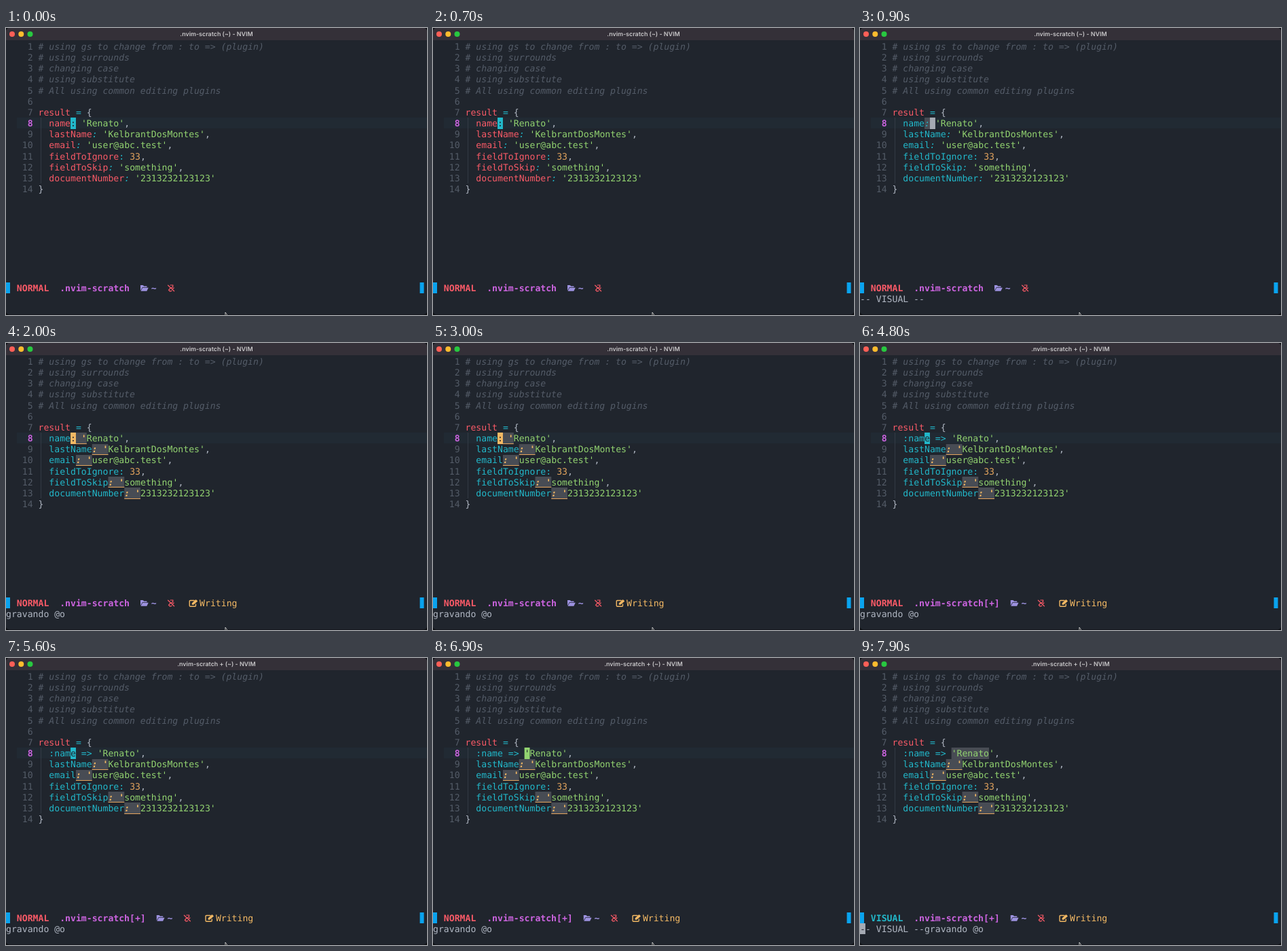
Animation, 620 px wide and 423 px high, one loop 8 s. Source, as an HTML page:

```html
<!DOCTYPE html>
<html>
<head>
<meta charset="utf-8">
<style>
  html, body { margin: 0; width: 100%; height: 100%; overflow: hidden; background: #0b0d10; }
  svg { display: block; }
  text { white-space: pre; text-rendering: geometricPrecision; }
  #screen { font: 13.155px "DejaVu Sans Mono", monospace; }
  .b { font-weight: bold; }
  .i { font-style: italic; }
  #title { font: 600 8.9px Inter, sans-serif; fill: #c9c8ca; text-anchor: middle; }
</style>
</head>
<body>
<svg width="620" height="423" viewBox="0 0 620 423">
  <rect width="620" height="422.5" rx="5" fill="#20252d"/>
  <path d="M0 18V5a5 5 0 0 1 5-5H615a5 5 0 0 1 5 5V18z" fill="#343038"/>
  <circle cx="9" cy="9" r="4" fill="#ff5f57"/>
  <circle cx="22.3" cy="9" r="4" fill="#febc2e"/>
  <circle cx="35.5" cy="9" r="4" fill="#28c840"/>
  <text id="title" x="310" y="12.3"></text>
  <g id="screen"></g>
  <path d="M323 419v6l3-1.5z" fill="#000" stroke="#e8e8e8" stroke-width=".8"/>
</svg>
<script>
const CW = 7.92, RH = 16.17, TOP = 19.3;
const BG = '#20252d', FG = '#b0b7c3', GREY = '#545c68', RED = '#f95a67', TEAL = '#22b8ca',
  GREEN = '#92d370', ORANGE = '#e5a55e', YELLOW = '#f3b964', PURPLE = '#cc64e0',
  LILAC = '#9d92e0', BLUE = '#0aa3ee', SELECT = '#484c54', BLOCK = '#a5aab3';

const comments = [
  '# using gs to change from : to => (plugin)', '# using surrounds', '# changing case',
  '# using substitute', '# All using common editing plugins'
];
const fields = [
  ['name', "'Renato'", ','], ['lastName', "'KelbrantDosMontes'", ','], ['email', "'user@abc.test'", ','],
  ['fieldToIgnore', '33', ','], ['fieldToSkip', "'something'", ','], ['documentNumber', "'2313232123123'", '']
];

// Each step overrides parts of the state before it.
const steps = [
  { at: 0, col: 12, color: TEAL, key: RED, mode: 'NORMAL', msg: '', from: 0, rec: false, edited: false },
  { at: 800, col: 13, color: BLOCK, key: TEAL, from: 12, msg: '-- VISUAL --' },
  { at: 1000, col: 14, color: GREEN, mode: 'VISUAL' },
  { at: 1900, col: 12, color: YELLOW, mode: 'NORMAL', from: 0, rec: true, msg: 'gravando @o' },
  { at: 4300, color: TEAL, edited: true },
  { at: 6300, col: 14 },
  { at: 6500, col: 17, color: GREEN },
  { at: 7100, from: 17, mode: 'VISUAL', msg: '-- VISUAL --gravando @o' },
  { at: 7600, col: 23 },
  { at: 7900, color: '' }
];

const rowY = row => Math.round(TOP + row * RH);
const rect = (x, y, w, h, fill) => `<rect x="${x}" y="${y}" width="${w}" height="${h}" fill="${fill}"/>`;
const cells = (row, col, n, fill) => rect(col * CW, rowY(row), n * CW, rowY(row + 1) - rowY(row), fill);
const put = (row, col, str, fill, cls = '') =>
  `<text x="${col * CW}" y="${TOP + row * RH + 12.6}" fill="${fill}" class="${cls}">${str}</text>`;
const icon = (col, paths) => `<g transform="translate(${col * CW} 378)" fill="none" stroke-linecap="round">${paths}</g>`;

// Draws consecutive runs of [text, colour, class].
function runs(row, col, list) {
  return list.map(([str, fill, cls]) => {
    const out = put(row, col, str, fill, cls);
    col += str.length;
    return out;
  }).join('');
}

function field([key, value, end], i, s) {
  const row = 7 + i, quoted = value[0] === "'", valueColor = quoted ? GREEN : ORANGE;
  if (!i && s.edited)
    return runs(row, 8, [[':' + key, TEAL], [' => ', TEAL], [value, GREEN], [end, FG]]);
  if (!s.rec || !quoted)
    return runs(row, 8, [[key, s.key], [':', TEAL, quoted ? 'i' : ''], [' ', FG], [value, valueColor], [end, FG]]);
  const col = 8 + key.length;
  return cells(row, col, 3, SELECT) + rect(col * CW, rowY(row + 1) - 1, 3 * CW, 1, ORANGE) +
    runs(row, 8, [[key, TEAL], [": '", YELLOW, 'b i'], [value.slice(1), GREEN], [end, FG]]);
}

function status(s) {
  const shift = s.edited ? 3 : 0, barY = rowY(22);
  let out = rect(0, barY, 6, 16, BLUE) + rect(609.5, barY, 6, 16, BLUE) +
    put(22, 2, s.mode, s.mode === 'NORMAL' ? RED : TEAL, 'b') +
    put(22, 10, '.nvim-scratch' + (s.edited ? '[+]' : ''), PURPLE, 'b') +
    icon(25 + shift, `<path d="M0 9V1h4l1 1.5h4.5V4H3z" fill="${LILAC}"/><path d="M.5 9.7 3.2 4.7h8.6L9.3 9.7z" fill="${LILAC}"/>`) +
    put(22, 27 + shift, '~', LILAC, 'b') +
    icon(30 + shift, `<path d="M1 1.2 10 9.8M4.5 1h3.7v2.2L6 5M4.4 5.5 2 8.2 3.8 10l2.6-.6M8 6.2 9.6 5" stroke="${RED}" stroke-width="1.2"/>`);
  if (s.rec)
    out += icon(34 + shift, `<path d="M8 1.5H2.2Q1 1.5 1 2.7V9q0 1.2 1.2 1.2H9q1.2 0 1.2-1.2V7" stroke="${YELLOW}" stroke-width="1.4"/>
      <path d="M4.5 7.8V5.6L10.4 0 13 2.4 7 7.8z" fill="${YELLOW}"/>`) + put(22, 36 + shift, 'Writing', YELLOW);
  return out + put(23, 0, s.msg, FG);
}

function cursor(s) {
  if (!s.color) return cells(23, 0, 1, BLOCK) + put(23, 0, '-', BG);
  const [key, value] = fields[0];
  const line = s.edited ? `:${key} => ${value},` : `${key}: ${value},`;
  return cells(7, s.col, 1, s.color) + put(7, s.col, line[s.col - 8], BG);
}

function draw(s) {
  let out = s.mode === 'NORMAL' ? rect(16, rowY(7), 604, 16, '#212a33') : '';
  if (s.from) out += cells(7, s.from, s.col - s.from + 1, SELECT);
  for (let n = 1; n <= 14; n++)
    out += put(n - 1, 3, String(n).padStart(2), n === 8 ? PURPLE : GREY, n === 8 ? 'b' : '');
  comments.forEach((c, i) => out += put(i, 6, c, GREY, 'i'));
  out += runs(6, 6, [['result', RED], [' = ', TEAL], ['{', FG]]) + put(13, 6, '}', FG);
  out += rect(51, rowY(7), 0.8, 6 * RH, '#39404a');
  fields.forEach((f, i) => out += field(f, i, s));
  screenGroup.innerHTML = out + status(s) + cursor(s);
  title.textContent = `.nvim-scratch ${s.edited ? '+ ' : ''}(~) - NVIM`;
}

const screenGroup = document.getElementById('screen'), title = document.getElementById('title');
let shown = -1;
const start = performance.now();
function tick() {
  const t = (performance.now() - start) % 8000;
  const past = steps.filter(step => step.at <= t);
  if (past.length !== shown) {
    shown = past.length;
    draw(Object.assign({}, ...past));
  }
  requestAnimationFrame(tick);
}
tick();
</script>
</body>
</html>
```
